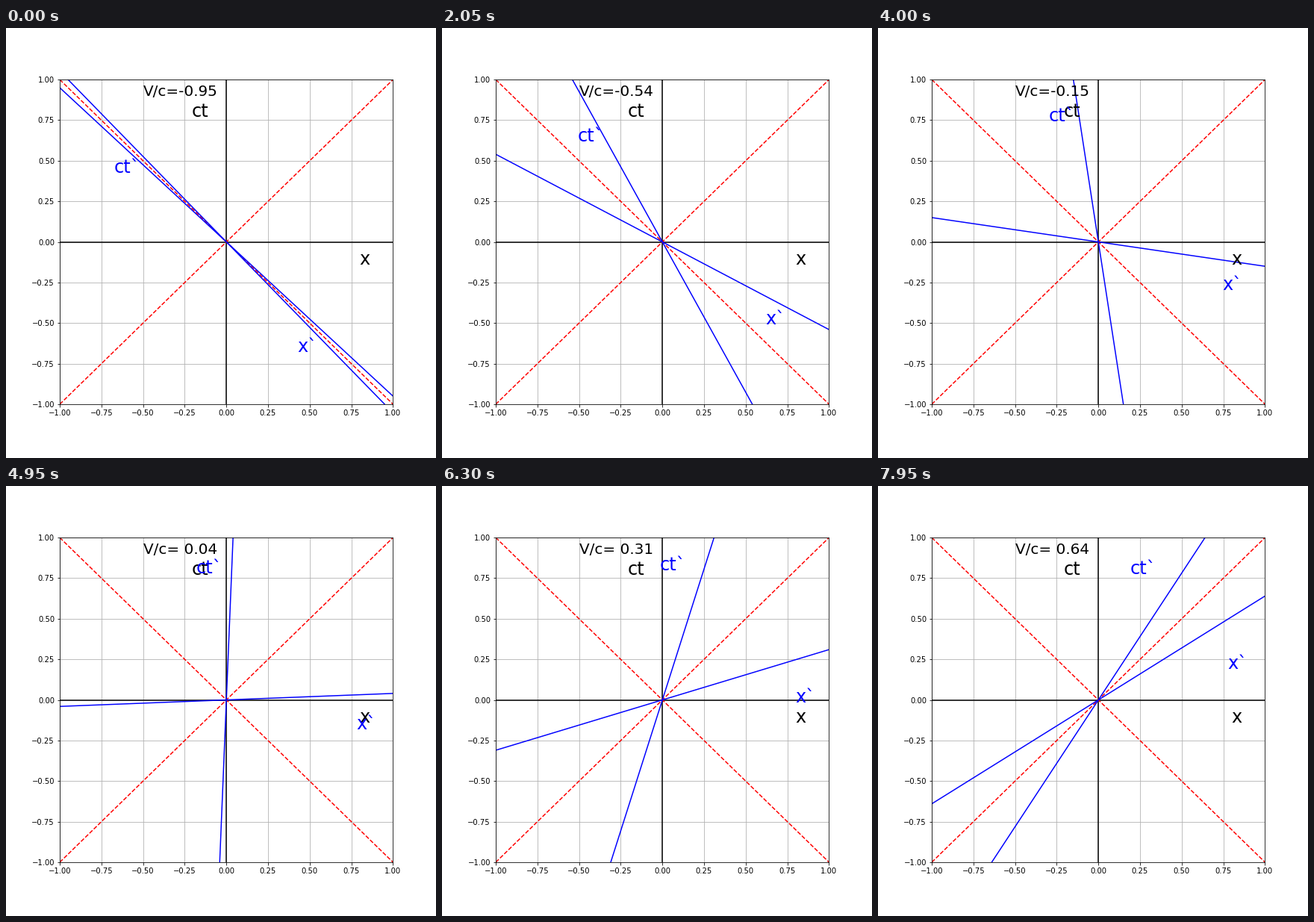
Write a matplotlib script that moves like this. It is 576 px wide and 576 px high and loops after 8000 ms.

```python
import numpy as np
import matplotlib.pyplot as plt
from matplotlib.animation import FuncAnimation

FRAMES, INTERVAL = 160, 50
V_START, V_STEP = -0.95, 0.01
RADIUS, LAG = 0.8, np.pi / 12  # label orbit around the origin

plt.rcParams["font.family"] = "DejaVu Sans"
fig = plt.figure(figsize=(8, 8), dpi=72, facecolor="white")
ax = fig.add_axes([0.125, 0.125, 0.775, 0.755])
ax.set(xlim=(-1, 1), ylim=(-1, 1))
ticks = np.linspace(-1, 1, 9)
ax.set_xticks(ticks)
ax.set_yticks(ticks)
ax.grid(True, color="#b0b0b0", lw=0.8)

ends = np.array([-1.0, 1.0])


def line(xs, ys, color, style="-"):
    return ax.plot(xs, ys, color=color, ls=style, lw=1.5)[0]


def label(x, y, text, color="black", size=24):
    return ax.text(x, y, text, color=color, fontsize=size)


line(ends, 0 * ends, "black")
line(0 * ends, ends, "black")
line(ends, ends, "red", "--")
line(ends, -ends, "red", "--")
time_axis = line(ends, ends, "blue")
space_axis = line(ends, ends, "blue")

label(RADIUS, -0.14, "x")
label(-RADIUS * np.sin(LAG), RADIUS * np.cos(LAG), "ct")
speed = label(-0.5, 0.9, "", size=20)
x_label = label(0, 0, "x`", "blue")
ct_label = label(0, 0, "ct`", "blue")


def update(i):
    v = round(V_START + V_STEP * i, 2) + 0.0
    time_axis.set_data(v * ends, ends)
    space_axis.set_data(ends, v * ends)
    angle = np.pi / 4 * v - LAG
    near, far = RADIUS * np.sin(angle), RADIUS * np.cos(angle)
    ct_label.set_position((near, far))
    x_label.set_position((far, near))
    speed.set_text(f"V/c={v: .2f}")
    return time_axis, space_axis, ct_label, x_label, speed


anim = FuncAnimation(fig, update, frames=FRAMES, interval=INTERVAL,
                     init_func=lambda: update(0), repeat=True, repeat_delay=0)
plt.show()
```
